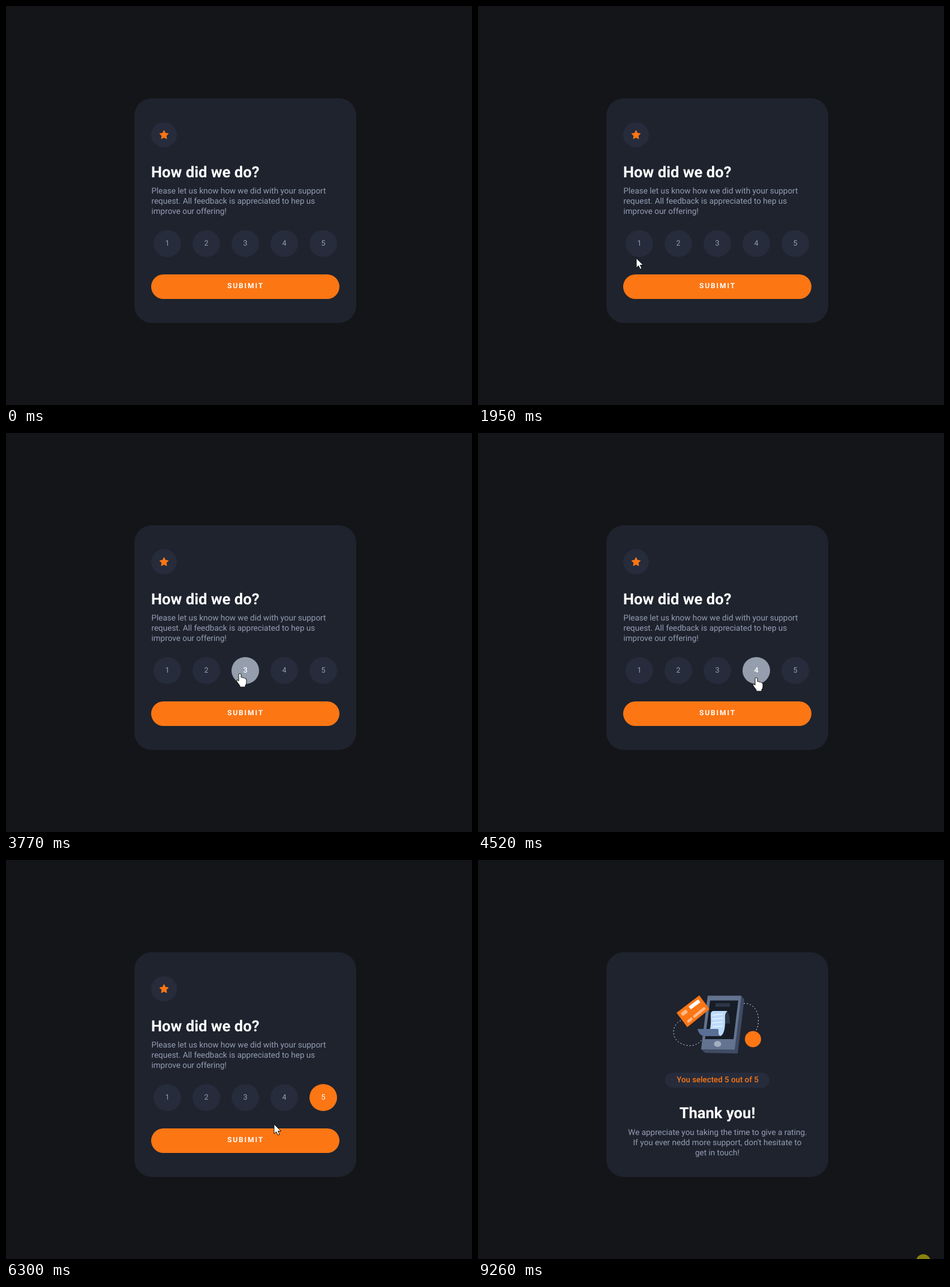
Animation of 777 by 666 pixels, one loop 9330 ms. Source, as an HTML page:

```html
<!DOCTYPE html>
<html lang="en">
<head>
<meta charset="utf-8">
<title>Rating card</title>
<style>
  html, body { margin: 0; width: 100%; height: 100%; overflow: hidden; background: #141518; }
  svg { display: block; width: 777px; height: 666px; }
  text { font-family: Roboto, sans-serif; text-rendering: geometricPrecision; }
  .title { font-size: 25.6px; font-weight: 700; fill: #fff; }
  .copy { font-size: 13.5px; fill: #959eb3; }
  .mid { text-anchor: middle; }
  .soft { fill: #262c3b; }
  .orange { fill: #fc7614; }
  .rate text { font-size: 12.5px; fill: #959eb3; text-anchor: middle; }
  .rate.picked rect { fill: #fc7614; }
  .rate.hover rect { fill: #959eac; }
  .rate.picked text, .rate.hover text { fill: #fff; }
  .rate.hover text { font-weight: 500; }
  #submit rect { fill: #fc7614; }
  #submit text { fill: #fff; font-size: 12px; font-weight: 700; letter-spacing: 1.9px; }
  #submit.hover rect { fill: #fff; }
  #submit.hover text { fill: #fc7614; }
  .dots { fill: none; stroke: #dfe5ee; stroke-dasharray: 2 3.2; }
  .pointer { fill: #fff; stroke: #101114; stroke-width: 1; stroke-linejoin: round; }
</style>
</head>
<body>
<svg viewBox="0 0 777 666">
  <rect width="777" height="666" fill="#141518"/>
  <rect x="214" y="154" width="370" height="375" rx="29" fill="#1e232e"/>

  <g id="form">
    <ellipse class="soft" cx="263.5" cy="215" rx="21.5" ry="21"/>
    <path id="star" class="orange" stroke="#fc7614" stroke-width="1.6" stroke-linejoin="round"/>
    <text class="title" x="242" y="286">How did we do?</text>
    <g class="copy">
      <text x="242.5" y="313">Please let us know how we did with your support</text>
      <text x="242.5" y="330">request. All feedback is appreciated to hep us</text>
      <text x="242.5" y="347">improve our offering!</text>
    </g>
    <g id="ratings"></g>
    <g id="submit">
      <rect x="242" y="448" width="314" height="41" rx="20.5"/>
      <text class="mid" x="399.5" y="471.3">SUBIMIT</text>
    </g>
  </g>

  <g id="thanks">
    <path class="dots" d="M338 268C322 276 322 298 338 306S367 309 375 298M443 239.5C458 238 467 252 467.500 264C468 275 466 280 463 286"/>
    <path fill="#3f4b62" d="M439 227L444 233L433 323L379 322L372 316Z"/>
    <path fill="#64738f" d="M383 226.500H439L428 316.500L372 316Z"/>
    <path fill="#171d26" d="M387 234.500H434L426 299H378.500Z"/>
    <path fill="#2c3646" d="M396 239H420V245H396ZM414 252Q420 254 420 273H410Z"/>
    <ellipse cx="399.500" cy="307" rx="6" ry="5" fill="#a3afc1"/>
    <path fill="#bcdafc" d="M393 252H416C411 256 412 262 412 270C412 284 409 292 404 294C398 291 402 285 400 282H387C389 272 388 262 388 258Q388 252 393 252Z"/>
    <path fill="none" stroke="#fff" stroke-width="1.200" d="M391 259L408 257M391 265.500L409 264M391 272L408 270.500M391 278.500L408 277"/>
    <path fill="#5a6f94" d="M366 282H400C400 288 401 292 404 294H379C371 294 368 289 366 282Z"/>
    <path class="orange" d="M331 255L369 226L386 249L349 279Z"/>
    <g fill="none" stroke="#ffb98a" stroke-width="4.500" stroke-linecap="round">
      <path d="M361 261L377 248M351 269L355.500 265.500"/>
      <path stroke-width="6.500" d="M342 256.500L346 253.500"/>
      <path stroke="#fff" stroke-width="6" stroke-linecap="butt" d="M353 247L369 235"/>
    </g>
    <circle class="orange" cx="458.500" cy="299" r="13.500"/>
    <rect class="soft" x="312" y="355" width="174" height="25" rx="12.500"/>
    <text class="mid orange" x="399.500" y="371.300" font-size="13.300" font-weight="500">You selected 5 out of 5</text>
    <text class="title mid" x="399" y="430.500">Thank you!</text>
    <g class="copy mid">
      <text x="399.500" y="459">We appreciate you taking the time to give a rating.</text>
      <text x="399" y="476">If you ever nedd more support, don't hesitate to</text>
      <text x="399" y="493">get in touch!</text>
    </g>
  </g>

  <circle id="halo" cx="742.500" cy="670" r="12" fill="#87820f"/>
  <g id="cursor">
    <path id="arrow" class="pointer" d="M0 0V16L3.700 12.600L6.300 18.300L9 17.100L6.500 11.500H11.500Z"/>
    <path id="hand" class="pointer" d="M-2 1.500Q0 -1 2 1.500V7Q4 5.800 5.200 7.800Q7.200 6.800 8.200 8.800Q11 8.300 11 11V16Q10.500 19 9 20.500V23H0V21L-5 14Q-6.500 11 -4 11L-2 13Z"/>
    <path id="beam" fill="none" stroke="#e8e8e8" d="M-3 -7.500H-1L.5 -6.500L2 -7.500H4M.5 -6.500V6.500M-3 7.500H-1L.5 6.500L2 7.500H4"/>
  </g>
</svg>
<script>
const LOOP = 9330, SENT = 6710;
const $ = id => document.getElementById(id);
const show = (id, on) => $(id).style.display = on ? "" : "none";

// Pointer path: time, x, y
const path = [
  [840, 537, 656], [980, 490, 636], [1120, 437, 656], [1190, 420, 668],
  [1390, 398, 632], [1530, 372, 593], [1670, 282, 508], [1810, 263, 440], [2000, 264, 415], [2220, 267, 409],
  [2350, 267, 409], [2700, 326, 414], [3040, 334, 407],
  [3240, 334, 407], [3500, 376, 403], [3770, 390, 401],
  [3900, 390, 401], [4110, 450, 410],
  [4180, 450, 410], [4400, 463, 408], [4600, 465, 408], [4850, 512, 411], [5070, 528, 411],
  [5610, 528, 411], [6030, 462, 428],
  [6230, 462, 428], [6510, 404, 478],
  [8640, 404, 478], [8990, 722, 666]
];
const clicks = [2300, 3040, 3700, 4450, 5140];
const centerX = i => 269 + 65 * i;

$("star").setAttribute("d", "M" + Array.from({ length: 10 }, (_, i) => {
  const r = i % 2 ? 3.4 : 7, a = i * Math.PI / 5;
  return [263.5 + r * Math.sin(a), 215.4 - r * Math.cos(a)].map(v => v.toFixed(2));
}).join("L") + "Z");

$("ratings").innerHTML = clicks.map((_, i) =>
  `<g class="rate"><rect class="soft" x="${centerX(i) - 23}" y="374" width="46" height="45" rx="23" ry="22.5"/>
   <text x="${centerX(i)}" y="399.5">${i + 1}</text></g>`).join("");
const rates = [...document.querySelectorAll(".rate")];

function pointerAt(t) {
  const next = path.findIndex(p => p[0] > t);
  if (next < 1 || (t >= 1190 && t < 1390)) return null;
  const [t0, x0, y0] = path[next - 1], [t1, x1, y1] = path[next];
  const k = (t - t0) / (t1 - t0);
  return { x: x0 + (x1 - x0) * k, y: y0 + (y1 - y0) * k };
}

function draw(t) {
  const p = pointerAt(t), sent = t >= SENT;
  const inside = (x, y, w, h) => p && p.x >= x && p.x <= x + w && p.y >= y && p.y <= y + h;
  const picked = clicks.filter(c => c <= t).length - 1;
  let hand = false;

  rates.forEach((el, i) => {
    const hover = !sent && p && Math.hypot(p.x - centerX(i), p.y - 396.5) <= 23;
    el.classList.toggle("hover", !!hover);
    el.classList.toggle("picked", i === picked);
    hand = hand || hover;
  });
  const onButton = !sent && inside(242, 448, 314, 41);
  $("submit").classList.toggle("hover", !!onButton);
  hand = hand || onButton;
  const beam = sent && inside(242, 446, 314, 52);

  show("form", !sent);
  show("thanks", sent);
  show("halo", t >= 9260);
  show("cursor", p);
  show("hand", hand);
  show("beam", beam);
  show("arrow", !hand && !beam);
  if (p) $("cursor").setAttribute("transform", `translate(${Math.round(p.x)} ${Math.round(p.y)})`);
}

const start = performance.now();
function tick() {
  draw((performance.now() - start) % LOOP);
  requestAnimationFrame(tick);
}
tick();
</script>
</body>
</html>
```
